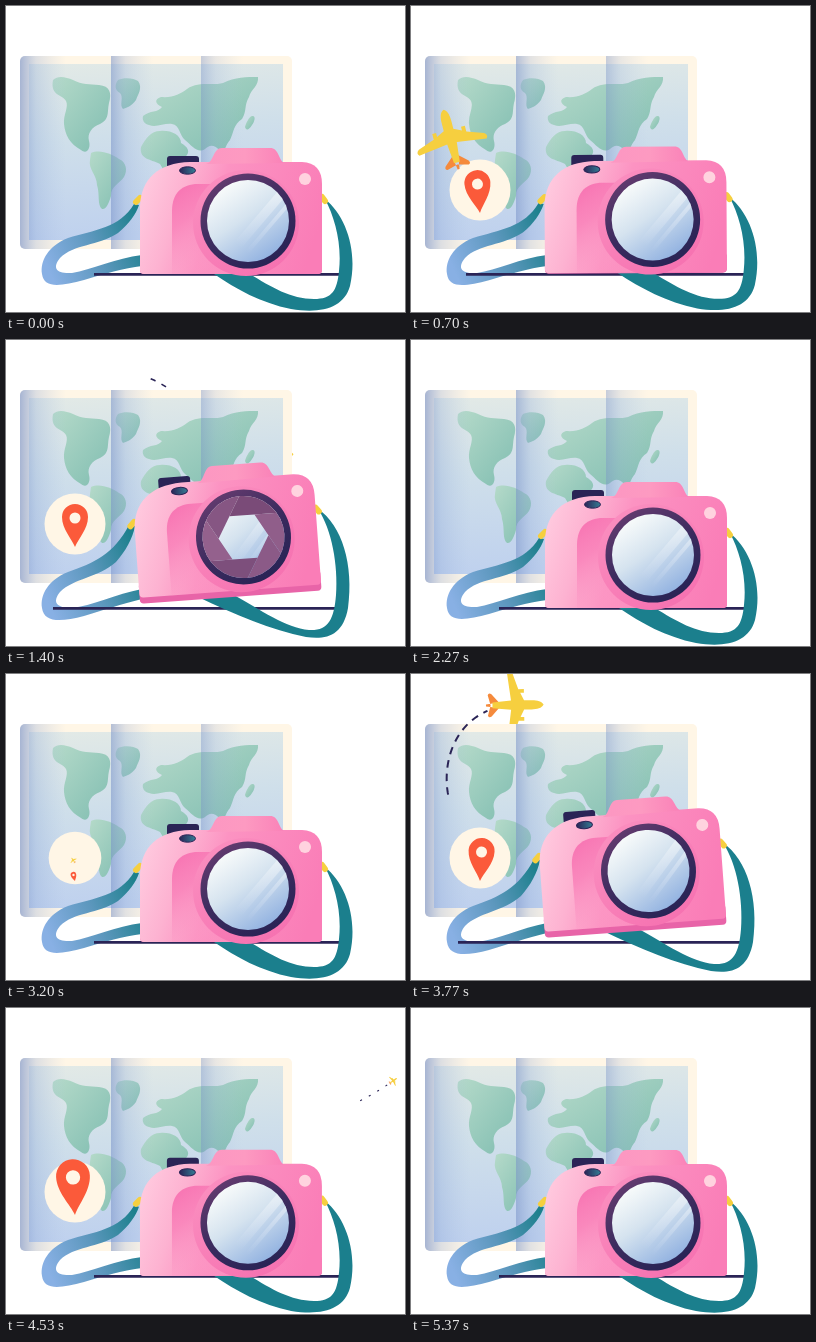
An HTML page for the animation above (5.41 s loop, 399 by 306 pixels).

```html
<!DOCTYPE html>
<html lang="en">
<head>
<meta charset="utf-8">
<title>Travel camera</title>
<style>
html, body { margin: 0; width: 100%; height: 100%; overflow: hidden; background: #fff; }
svg { display: block; width: 100vw; height: 100vh; }
.trail { fill: none; stroke: #2a2456; }
</style>
</head>
<body>
<svg viewBox="0 0 399 306">
  <defs>
    <linearGradient id="sea" x1="0" y1="0" x2=".15" y2="1">
      <stop offset="0" stop-color="#e3eae6"/><stop offset=".45" stop-color="#cfdfea"/><stop offset="1" stop-color="#bfd1ee"/>
    </linearGradient>
    <linearGradient id="fold">
      <stop offset="0" stop-color="#7791c8" stop-opacity=".65"/>
      <stop offset=".35" stop-color="#8ea8d8" stop-opacity=".3"/>
      <stop offset="1" stop-color="#a9bfe4" stop-opacity="0"/>
    </linearGradient>
    <linearGradient id="land" x1="0" y1="0" x2="1" y2="1">
      <stop offset="0" stop-color="#b5dac9"/><stop offset="1" stop-color="#80bdb1"/>
    </linearGradient>
    <linearGradient id="body" x1="0" y1=".3" x2="1" y2=".5">
      <stop offset="0" stop-color="#ffc9de"/><stop offset=".22" stop-color="#fdb2d1"/>
      <stop offset=".42" stop-color="#fc93c2"/><stop offset="1" stop-color="#fa7db7"/>
    </linearGradient>
    <linearGradient id="hump">
      <stop offset="0" stop-color="#fc97c2"/><stop offset=".5" stop-color="#fd9ac1"/><stop offset="1" stop-color="#fa82b8"/>
    </linearGradient>
    <linearGradient id="grip" x1="0" y1="0" x2=".5" y2="1">
      <stop offset="0" stop-color="#f76fb0"/><stop offset=".4" stop-color="#f97fb8" stop-opacity=".8"/>
      <stop offset="1" stop-color="#fda6cc" stop-opacity=".1"/>
    </linearGradient>
    <linearGradient id="barrel" x1="0" y1="0" x2=".7" y2="1">
      <stop offset="0" stop-color="#fb92c1"/><stop offset="1" stop-color="#f672b1"/>
    </linearGradient>
    <linearGradient id="rim" x1="0" y1="0" x2=".6" y2="1">
      <stop offset="0" stop-color="#6d3f73"/><stop offset=".6" stop-color="#3b2b5e"/><stop offset="1" stop-color="#2a2456"/>
    </linearGradient>
    <linearGradient id="glass" x1=".2" y1=".05" x2=".8" y2=".95">
      <stop offset="0" stop-color="#fafcfb"/><stop offset=".45" stop-color="#d5e3ef"/><stop offset="1" stop-color="#8fb0e0"/>
    </linearGradient>
    <linearGradient id="sheen" gradientUnits="userSpaceOnUse" x1="232" y1="240" x2="274" y2="190">
      <stop offset="0" stop-color="#fff" stop-opacity="0"/><stop offset="1" stop-color="#fff" stop-opacity=".4"/>
    </linearGradient>
    <linearGradient id="strap" gradientUnits="userSpaceOnUse" x1="42" y1="262" x2="136" y2="222">
      <stop offset="0" stop-color="#88b0e4"/><stop offset=".5" stop-color="#5c97bd"/><stop offset="1" stop-color="#1d808d"/>
    </linearGradient>
    <linearGradient id="button">
      <stop offset="0" stop-color="#2a2456"/><stop offset="1" stop-color="#347d94"/>
    </linearGradient>
    <clipPath id="mapClip"><rect x="14" y="50" width="272" height="193" rx="5"/></clipPath>
    <clipPath id="lensClip"><circle cx="242" cy="215" r="41"/></clipPath>
    <g id="plane">
      <path fill="#f58a3c" d="M-3 19L-12 27Q-14 30-11 31L0 28L11 31Q14 30 12 27L3 19L1 33H-1Z"/>
      <path fill="#f6cf3f" d="M0-29C4-27 5-22 5-16V-8L13-4V-8H17V-2L34 4Q38 7 35 10L5 6L3 26H-3L-5 6L-35 10Q-38 7-34 4L-17-2V-8H-13V-4L-5-8V-16C-5-22-4-27 0-29Z"/>
    </g>
  </defs>

  <g id="back"></g>

  <g clip-path="url(#mapClip)">
    <rect x="14" y="50" width="272" height="193" fill="#fff6e6"/>
    <rect x="23" y="58" width="254" height="176" fill="url(#sea)"/>
    <g fill="url(#land)">
      <path d="M47 74C52 69 60 71 67 74C76 79 84 78 93 79C104 80 106 87 103 97C101 106 104 113 94 118C86 121 81 127 83 135C85 142 81 149 75 144C64 138 59 129 58 118C57 109 63 101 60 95C56 88 44 90 47 74Z"/>
      <path d="M112 74C118 71 128 72 132 75C137 82 132 88 130 94C126 100 120 102 117 103C113 99 118 91 114 87C108 84 109 78 112 74Z"/>
      <path d="M85 147C94 143 106 148 113 153C120 156 122 164 118 171C113 178 105 180 105 190C103 197 100 204 96 203C91 199 94 188 91 179C91 169 82 163 84 154Z"/>
      <path d="M137 110C144 104 152 107 156 101C149 98 148 93 155 91C167 92 174 88 181 83C193 75 207 80 217 77C229 71 241 71 252 71C253 80 245 83 243 91C238 99 241 105 236 113C227 119 228 126 224 134C219 139 219 149 213 144C208 138 203 139 199 143C192 148 186 140 179 134C173 129 174 119 166 118C158 117 150 122 143 119C138 118 136 114 137 110Z"/>
      <path d="M135 141C140 132 145 125 154 125C165 124 175 129 175 137C182 141 185 146 179 151L166 178L154 158C144 153 133 153 135 141Z"/>
      <path d="M246 110C250 109 249 115 246 119C243 124 240 125 239 121C240 117 243 111 246 110Z"/>
    </g>
    <rect x="14" y="50" width="46" height="193" fill="url(#fold)"/>
    <rect x="105" y="50" width="42" height="193" fill="url(#fold)" opacity=".85"/>
    <rect x="195" y="50" width="42" height="193" fill="url(#fold)" opacity=".65"/>
  </g>

  <circle id="disc" r="30.5" fill="#fff6e6"/>
  <g id="pin">
    <path fill="#fb5a3a" d="M0 0C-3-8-13-18-13-30A13 13 0 0 1 13-30C13-18 3-8 0 0Z"/>
    <circle cy="-29" r="5.5" fill="#fff6e6"/>
  </g>
  <g id="front"></g>

  <path id="strapL" fill="url(#strap)"/>
  <line id="ground" x2="339" y1="268.4" y2="268.4" stroke="#2a2456" stroke-width="2.6"/>
  <path id="strapR" fill="#1b7f8d"/>

  <g id="camera">
    <g stroke="#f6cf3f" stroke-width="6" stroke-linecap="round">
      <path d="M130 196L134 192M316 191L319 195"/>
    </g>
    <path id="base" fill="#e864a8" d="M134 250H316V264Q316 268 312 268H138Q134 268 134 264Z"/>
    <path fill="#2a2456" d="M161 160V153Q161 150 164 150H190Q193 150 193 153V160Z"/>
    <path fill="url(#body)" d="M134 264V200C135 173 152 157 184 156H296Q316 157 316 178V264Q316 268 312 268H138Q134 268 134 264Z"/>
    <path fill="url(#hump)" d="M200 158C208 156 207 142 216 142H264C273 142 272 153 278 157Z"/>
    <path fill="url(#grip)" d="M166 268V205C166 187 176 178 192 178H225V268Z"/>
    <circle cx="240" cy="217" r="53" fill="url(#barrel)"/>
    <ellipse cx="181.500" cy="164.500" rx="8" ry="3.700" fill="url(#button)" stroke="#2a2456"/>
    <circle cx="299" cy="173" r="6" fill="#ffd3df"/>
    <circle cx="242" cy="215" r="47.500" fill="url(#rim)"/>
    <circle cx="242" cy="215" r="41" fill="url(#glass)"/>
    <g clip-path="url(#lensClip)">
      <g stroke="url(#sheen)">
        <path stroke-width="9" d="M226 246L278 185"/>
        <path stroke-width="4" d="M238 250L290 189"/>
      </g>
      <g id="blades" transform="translate(242 215)"></g>
    </g>
  </g>
</svg>

<script>
const CYCLE = 2705;
const NS = 'http://www.w3.org/2000/svg';
const $ = id => document.getElementById(id);
const add = (parent, tag, attrs) => {
  const el = document.createElementNS(NS, tag);
  for (const k in attrs) el.setAttribute(k, attrs[k]);
  return parent.appendChild(el);
};
const smooth = u => u * u * (3 - 2 * u);
const linear = u => u;

// Keys are [time, value] pairs
function at(keys, t, ease = smooth) {
  if (t <= keys[0][0]) return keys[0][1];
  for (let i = 1; i < keys.length; i++) {
    const [a, v] = keys[i - 1], [b, w] = keys[i];
    if (t < b) return v + (w - v) * ease((t - a) / (b - a));
  }
  return keys[keys.length - 1][1];
}

// Same keys, with the speed kept continuous
function glide(keys, t) {
  const n = keys.length - 1;
  if (t <= keys[0][0]) return keys[0][1];
  if (t >= keys[n][0]) return keys[n][1];
  const i = keys.findIndex(k => k[0] > t) - 1;
  const slope = j => {
    const a = keys[Math.max(j - 1, 0)], b = keys[Math.min(j + 1, n)];
    return (b[1] - a[1]) / (b[0] - a[0]);
  };
  const [a, v] = keys[i], [b, w] = keys[i + 1], h = b - a, u = (t - a) / h;
  return v + (w - v) * smooth(u) + h * u * (1 - u) * ((1 - u) * slope(i) - u * slope(i + 1));
}

function morph(a, b, p) {
  const to = b.match(/-?\d+/g);
  let i = 0;
  return a.replace(/-?\d+/g, n => (+n + (to[i++] - n) * p).toFixed(2));
}

const LEFT = [
  'M128 198C114 222 88 224 62 232C42 240 34 255 36 268C38 283 55 280 78 274C98 268 118 262 136 260L136 249C110 252 85 264 66 267C50 268 46 262 54 252C68 238 92 240 112 227C123 218 130 208 133 199Z',
  'M123 185C108 214 88 223 62 232C42 240 34 255 36 268C38 283 55 282 78 276C98 270 115 264 136 259L136 249C110 254 85 266 66 268C50 268 46 262 54 252C68 238 92 238 110 222C119 212 127 198 129 186Z'
];
const RIGHT = [
  'M319 193C340 210 352 245 344 280C338 302 315 308 285 303C255 297 230 283 208 268L244 268C265 281 285 293 308 293C326 293 331 285 333 265C336 238 329 212 319 193Z',
  'M312 169C336 185 348 225 342 268C337 296 320 300 300 297C265 290 230 275 190 256L226 254C255 270 280 288 303 290C322 291 328 280 330 255C332 225 326 190 312 169Z'
];

const route = document.createElementNS(NS, 'path');
route.setAttribute('d', 'M70 190C55 170 43 150 38 125C28 82 50 31 107 31C165 31 190 78 225 105C260 124 305 112 345 97C365 88 378 80 402 62');
const total = route.getTotalLength();

const FLY = [[480, 0], [700, 66], [1065, 207], [1400, 398], [1700, 502], [1825, 525], [1960, 545]];
const TAIL = [[700, 50], [1065, 77], [1400, 247], [1825, 486], [1960, 545]];
const SIZE = [[480, 0], [640, 1], [1065, .93], [1250, .83], [1400, .62], [1600, .35], [1825, .15], [1960, 0]];
const LIFT = [[580, 0], [700, .08], [1000, 1], [1450, 1], [1790, .015], [1900, 0]];
const GROUND = [[560, 88], [700, 55], [900, 47], [1500, 47], [1780, 88]];
const DISC = [[380, 0], [540, 1.06], [640, 1], [1830, 1], [2020, 0]];
const PIN = [[430, 0], [650, 1], [1650, 1], [1825, 1.3], [1960, 0]];
const TILT = [[500, -14], [700, -5], [900, 5], [1065, 3], [1250, 0], [1650, 0], [1825, -3]];
const IRIS = [[1250, 50], [1400, 25], [1470, 4], [1620, 50]];
const APEX = 208;

const layers = ['back', 'front'].map(id => ({
  trail: add($(id), 'path', { class: 'trail' }),
  plane: add($(id), 'use', { href: '#plane' })
}));
const blades = ['#8b5a87', '#7d4f7c', '#94618d', '#865683', '#7a4b78', '#905e8a']
  .map(fill => add($('blades'), 'polygon', { fill }));

function drawTrail(el, from, to, size) {
  let d = '';
  for (let s = from; s < to; s += 2) {
    const p = route.getPointAtLength(s);
    d += `${d ? 'L' : 'M'}${p.x.toFixed(2)} ${p.y.toFixed(2)}`;
  }
  el.setAttribute('d', d);
  el.setAttribute('stroke-width', .9 + 1.2 * size);
  el.setAttribute('stroke-dasharray', `${1 + 7 * size} ${8 - 2 * size}`);
}

function drawPlane(t) {
  const dist = Math.min(glide(FLY, t), total), size = at(SIZE, t, linear);
  const p = route.getPointAtLength(dist);
  const a = route.getPointAtLength(Math.max(dist - 2, 0));
  const b = route.getPointAtLength(Math.min(dist + 2, total));
  const turn = Math.atan2(b.y - a.y, b.x - a.x) * 180 / Math.PI + 90;
  const pose = `translate(${p.x} ${p.y}) rotate(${turn}) scale(${size})`;
  const start = at(TAIL, t, linear), end = dist - 32 * size;
  const [back, front] = layers;
  const behind = t > 980;
  back.plane.setAttribute('transform', behind ? pose : 'scale(0)');
  front.plane.setAttribute('transform', behind ? 'scale(0)' : pose);
  drawTrail(front.trail, start, Math.min(end, APEX), size);
  drawTrail(back.trail, Math.max(start, APEX), end, size);
}

function drawIris(r) {
  $('blades').style.display = r > 48 ? 'none' : '';
  const spin = (25 - r) * 1.2;
  const dir = deg => [Math.cos(deg * Math.PI / 180), Math.sin(deg * Math.PI / 180)];
  const far = (v, d) => [v[0] + d[0] * 90, v[1] + d[1] * 90];
  blades.forEach((el, i) => {
    const deg = i * 60 + spin;
    const v = dir(deg).map(c => c * r), w = dir(deg + 60).map(c => c * r);
    el.setAttribute('points', [v, w, far(w, dir(deg + 120)), far(v, dir(deg + 60))].join(' '));
  });
}

function draw(t) {
  const p = at(LIFT, t);
  $('camera').setAttribute('transform', `translate(${-4.5 * p} ${-18 * p}) rotate(${-4.2 * p} 242 215)`);
  $('base').setAttribute('transform', `translate(0 ${6 * p})`);
  $('strapL').setAttribute('d', morph(...LEFT, p));
  $('strapR').setAttribute('d', morph(...RIGHT, p));
  $('ground').setAttribute('x1', at(GROUND, t));
  $('disc').setAttribute('transform', `translate(69 184) scale(${at(DISC, t)})`);
  $('pin').setAttribute('transform', `translate(69 207) rotate(${at(TILT, t)}) scale(${at(PIN, t)})`);
  drawPlane(t);
  drawIris(at(IRIS, t));
}

function tick() {
  draw(performance.now() % CYCLE);
  requestAnimationFrame(tick);
}
tick();
</script>
</body>
</html>
```
